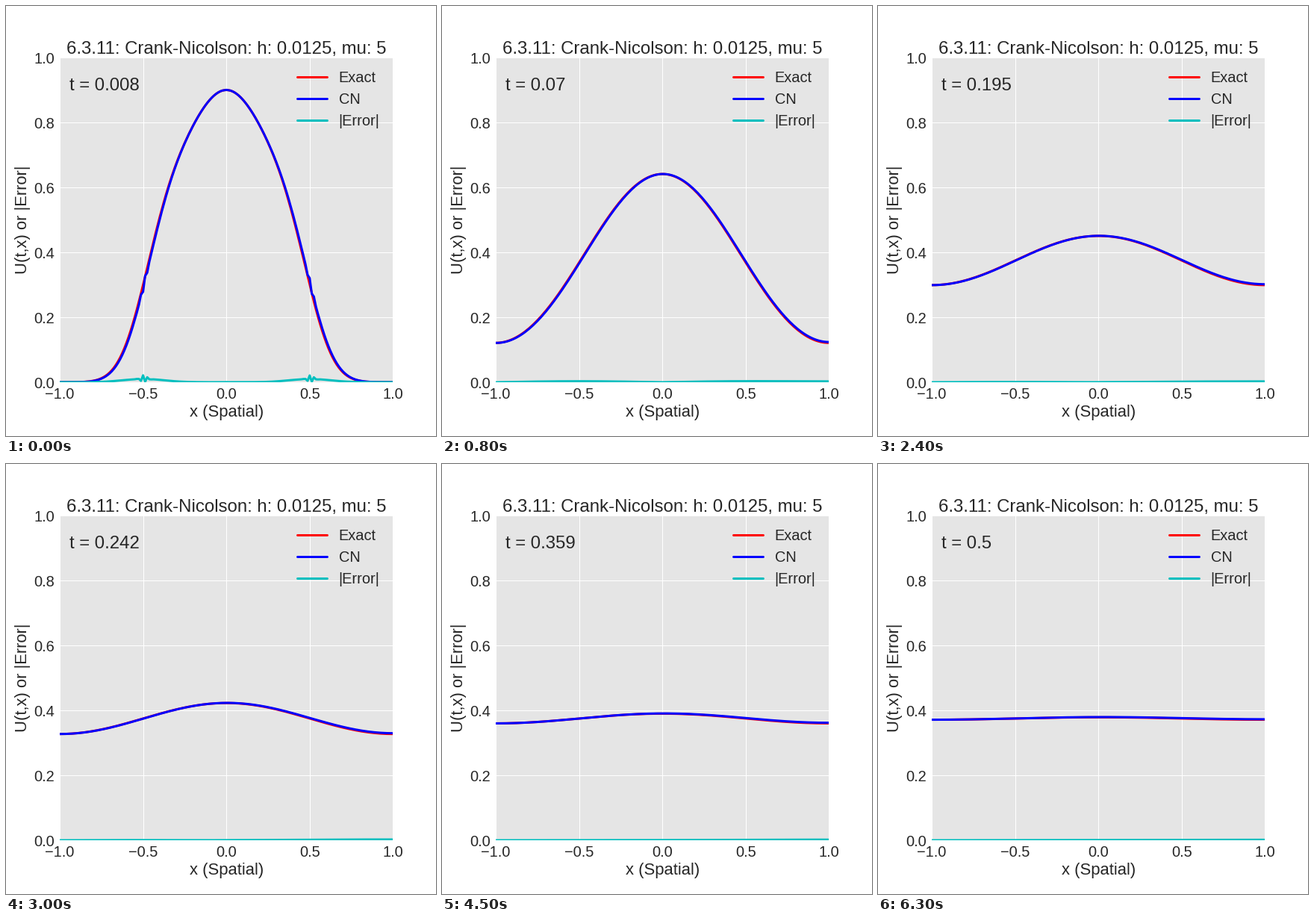
Animation, 576 px wide and 576 px high, one loop 6400 ms. Source, as a matplotlib script:

```python
import numpy as np
import matplotlib.pyplot as plt
from matplotlib.animation import FuncAnimation

H, MU = 0.0125, 5
K = MU * H**2            # time step
FRAMES, STEPS = 64, 10   # solver steps per frame
INK = "0.15"

x = np.linspace(-1, 1, round(2 / H) + 1)


def exact(t, x):
    """Fourier solution of the heat equation for the cut-off hat profile."""
    i = np.arange(40)[:, None]
    odd = 2 * i + 1
    w = np.pi * odd
    slow = ((-1.0)**i / w + 2 / w**2) * np.cos(w * x) * np.exp(-w**2 * t)
    fast = np.cos(2 * w * x) / w**2 * np.exp(-4 * w**2 * t)
    return 3 / 8 + (slow + fast).sum(axis=0)


def crank_nicolson():
    """Exact value on the left edge, zero slope on the right edge."""
    n = len(x)
    lap = np.diag(np.full(n, -2.0))
    lap += np.diag(np.ones(n - 1), 1) + np.diag(np.ones(n - 1), -1)
    lap[0] = 0
    lap[-1, -2] = 2
    inverse = np.linalg.inv(np.eye(n) - MU / 2 * lap)
    explicit = np.eye(n) + MU / 2 * lap

    j = np.arange(n)
    inside = (j > n // 4) & (j <= 3 * (n // 4))
    u = np.where(inside, 1 - np.abs(x), 0.0)
    rows = []
    for step in range(1, FRAMES * STEPS + 1):
        rhs = explicit @ u
        rhs[0] = exact(step * K, x[:1])[0]
        u = inverse @ rhs
        if step % STEPS == 0:
            rows.append(u)
    return rows


solution = crank_nicolson()

plt.rcParams.update({
    "font.family": "Liberation Sans",
    "text.color": INK,
    "axes.labelcolor": INK,
    "lines.linewidth": 3,
    "lines.solid_capstyle": "round",
})

fig = plt.figure(figsize=(8, 8), dpi=72, facecolor="white")
ax = fig.add_axes([0.125, 0.125, 0.775, 0.755], facecolor="#E5E5E5")
ax.set(xlim=(-1, 1), ylim=(0, 1), xticks=np.linspace(-1, 1, 5))
ax.grid(color="white", linewidth=1)
ax.set_axisbelow(True)
ax.spines[:].set_visible(False)
ax.tick_params(length=0, pad=7, labelsize=20, labelcolor=INK)
ax.set_title("6.3.11: Crank-Nicolson: h: 0.0125, mu: 5", fontsize=24, pad=5)
ax.set_xlabel("x (Spatial)", fontsize=22)
ax.set_ylabel("U(t,x) or |Error|", fontsize=22)

exact_line, = ax.plot([], [], color="red", label="Exact")
cn_line, = ax.plot([], [], color="blue", label="CN")
error_line, = ax.plot([], [], color="#00BFBF", label="|Error|")
clock = ax.text(-0.943, 0.9, "", fontsize=24)
ax.legend(loc="upper right", fontsize=20, frameon=False)


def draw(frame):
    t = (frame + 1) * STEPS * K
    truth, u = exact(t, x), solution[frame]
    exact_line.set_data(x, truth)
    cn_line.set_data(x, u)
    error_line.set_data(x, np.abs(truth - u))
    clock.set_text(f"t = {round(t, 3)}")
    return exact_line, cn_line, error_line, clock


anim = FuncAnimation(fig, draw, frames=FRAMES, interval=100,
                     repeat=True, repeat_delay=0)
plt.show()
```
